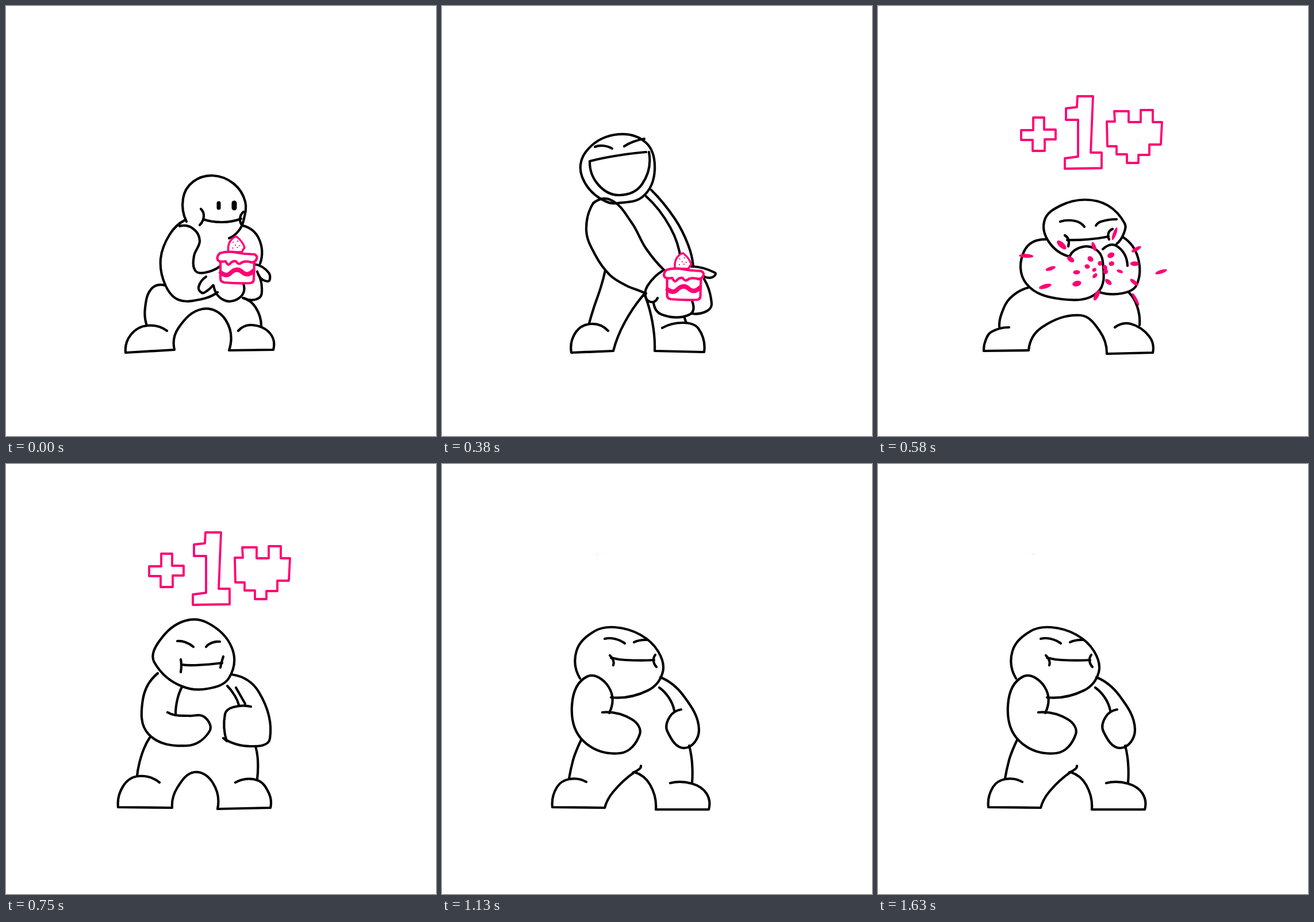
Animation of 748 by 748 pixels, one loop 1790 ms. Source, as an HTML page:

```html
<!DOCTYPE html>
<html lang="en">
<head>
<meta charset="utf-8">
<title>Cake snack</title>
<style>
html, body { margin: 0; width: 100%; height: 100%; overflow: hidden; background: #fff; }
svg { display: block; width: 100%; height: 100%; }
g { stroke-width: 4.2; stroke-linecap: round; stroke-linejoin: round; }
#body { fill: none; stroke: #000; }
#body .dotL { stroke-width: 7; }
#body .dotR { stroke-width: 9; }
#cake { fill: #fff; stroke: #ff0073; }
#bonus { fill: none; stroke: #ff0073; stroke-width: 3.8; }
#crumbs { fill: #ff0073; }
</style>
</head>
<body>
<svg viewBox="0 0 748 748">
  <path id="speck" d="M268.500 157.500l3-1.500" stroke="#ffb3d3"/>
  <g id="body"></g>
  <g id="cake">
    <path d="M373 444V474Q373 480 380 481Q404 483 425 482Q432 481 431 473L432 444Z"/>
    <path d="M374 464Q384 472 391 464Q402 454 411 463Q420 471 430 461" fill="none" stroke-width="7.500"/>
    <path d="M387 428Q385 417 390 409Q396 401 401 401Q412 410 415 420L410 428Z" stroke-width="3.500"/>
    <path d="M395 411h.1m8-2h.1m-4 7h.1m7 1h.1m-12 4h.1m8-1h.1" stroke-width="2.200"/>
    <path d="M372 430Q386 426 401 429T432 432Q439 435 435 442Q431 448 424 445Q414 443 409 447T400 444Q394 443 390 448T382 444Q370 446 368 441T372 430Z"/>
  </g>
  <g id="crumbs"></g>
  <g id="bonus">
    <path d="M270 156h19v21h20v17h-19v20h-21v-19h-20v-17h21z"/>
    <path d="M347 119h27l-4 98h19v27l-64 1v-18l23-3v-64h-21v-20l19-2z"/>
    <path d="M411 145h25v19h21v-21h21v21h16l-2 39h-20v18h-19v14h-20v-15h-18v-14h-16l-1-43h14z"/>
  </g>
</svg>
<script>
const LOOP = 1790;
const $ = id => document.getElementById(id);

// Key points of each stroke, joined by smooth curves; "|" marks a corner.
const sit = {
  legs: "280,565 245,556 217,572 208,603 | 293,598 | 300,560 342,527 382,546 388,599 | 465,598 | 459,569 428,555 404,565",
  hipL: "245,556 242,525 253,492 277,486",
  hipR: "412,508 434,524 444,557",
  head: "314,375 308,335 325,306 360,295 396,309 416,340 413,374 404,392 388,404",
  dotL: "370,343 370,351",
  dotR: "397,343 397,351",
  mouth: "343,371 376,376 409,370",
  cheekL: "339,353 344,366 337,381",
  cheekR: "413,358 407,370 411,382",
  armL: "312,372 285,397 269,440 277,485 300,511 340,510 368,498",
  inner: "302,383 325,387 337,408 327,435 329,460 345,464 372,453",
  armR: "412,382 440,405 442,448",
  thumbL: "348,471 335,489 341,499 349,496 360,486",
  handL: "361,486 380,512 408,506 413,483",
  thumbR: "432,449 457,464 455,479 437,462",
  handR: "414,508 440,508 445,490 439,467",
  cake: [0, 0]
};
const crouch = {
  legs: "265,576 233,562 206,578 201,605 | 280,601 | 283,562 310,539 372,545 406,601 | 488,596 | 486,562 452,544 417,558",
  hipL: "230,560 231,525 245,502 279,494",
  hipR: "424,497 450,518 459,545",
  side: "273,455 279,494",
  head: "316,391 316,358 343,331 370,327 405,335 434,357 436,380 428,405 418,414",
  eyeL: "352,367 363,373 379,375",
  eyeR: "399,375 412,373 420,366",
  mouth: "349,400 375,400 405,397",
  cheekL: "349,388 347,400 348,413",
  cheekR: "420,383 420,392 426,397",
  chin: "348,424 380,430",
  armL: "330,408 311,391 285,407 272,440 287,474 322,486 346,478",
  inner: "330,405 331,425 340,444 357,449 380,440",
  thumbL: "361,453 345,482 349,489 358,486 369,471",
  handL: "372,470 385,498 417,498 426,470",
  thumbR: "444,437 465,453 458,460 441,453",
  handR: "428,496 448,498 453,480 444,456",
  cake: [9.5, -14]
};
const laugh = {
  legs: "289,565 260,553 233,567 225,603 | 298,600 | 318,550 352,501 | 366,550 370,600 | 456,602 | 446,561 420,551 383,560",
  hipL: "256,552 264,525 276,490 284,460",
  hipR: "422,542 423,546 425,551",
  head: "285,340 244,298 250,254 300,224 354,237 370,285 350,331 305,343 285,340",
  eyeL: "266,245 280,243 296,248",
  eyeR: "317,244 333,236 352,231",
  mouth: "257,270 300,261 355,254",
  jaw: "257,271 272,311 308,329 348,310 360,254",
  armL: "263,343 251,390 266,432 292,468 322,487 340,494 355,500",
  inner: "263,343 295,338 330,377 355,422 387,460",
  armR: "364,320 405,370 428,415 437,453",
  fold: "355,331 397,385 415,440",
  thumbL: "383,461 358,486 354,505 364,515 375,508",
  handL: "368,515 383,537 430,537 435,513",
  thumbR: "433,453 475,464 470,472 455,470",
  handR: "456,475 469,518 460,531 435,535",
  cake: [18.5, 29]
};
const munch = {
  legs: "228,559 197,567 187,582 184,600 | 262,599 | 285,559 352,538 386,566 398,605 | 478,603 | 472,575 440,553 412,559",
  hipL: "211,558 215,535 230,508 261,490",
  hipR: "437,499 451,523 455,555",
  head: "333,436 297,410 290,372 318,347 360,337 400,347 429,378 427,397 415,414",
  eyeL: "317,375 343,374 359,384",
  eyeR: "379,382 388,375 415,371",
  mouth: "329,407 365,406 401,401",
  cheekL: "325,399 331,406 331,418",
  cheekR: "408,388 401,395 402,406",
  armL: "294,406 254,427 258,483 320,510 382,498 391,445 375,421 347,422 332,440",
  armR: "426,402 452,437 450,485 424,500 383,497",
  fist: "391,423 416,418 434,452",
  cake: [-5, -20]
};
const flex = {
  legs: "267,554 230,543 204,560 195,597 | 289,598 | 298,563 328,536 360,555 368,600 | 460,598 | 457,572 437,550 399,554",
  hipL: "228,543 232,520 240,495 250,476",
  hipR: "434,491 438,515 437,548",
  head: "307,387 258,345 264,312 305,275 350,276 393,320 388,372 350,391 307,387",
  eyeL: "298,308 312,310 326,318",
  eyeR: "348,318 358,311 372,309",
  mouth: "305,349 330,350 376,346",
  cheekL: "304,340 305,350 304,362",
  cheekR: "378,335 375,345 373,354",
  armL: "264,364 238,410 248,470 314,490 354,465 345,440 318,438 295,437 281,432",
  inner: "306,388 298,410 295,436",
  armR: "392,366 440,397 459,478 425,491 378,477 | 384,482 | 381,435 395,423 426,422",
  fold: "385,386 398,403 405,419",
  crease: "400,389 416,417"
};
const proud = {
  legs: "251,553 222,548 200,562 192,597 | 283,598 | 298,570 335,536 | 362,558 372,601 | 464,601 | 460,573 435,556 397,555",
  seam: "332,537 344,530 346,525",
  hipL: "221,547 228,515 234,498 242,480",
  hipR: "430,490 435,520 435,554",
  head: "240,373 234,325 265,291 301,284 345,297 376,326 384,362 358,394 294,406",
  eyeL: "283,304 300,304 318,312",
  eyeR: "334,310 343,307 356,306",
  mouth: "294,337 320,341 369,341",
  cheekL: "292,333 298,342 298,350",
  cheekR: "371,332 368,342 373,353",
  armL: "291,433 290,388 252,370 226,420 245,481 310,503 344,470 330,444 279,432",
  armR: "380,371 420,403 447,462 422,494 392,465 396,440 416,427",
  fold: "378,389 395,407 404,429"
};

const lerp = (a, b, t) => a + (b - a) * t;
const mix = (p, q, t) => p.map((v, i) => lerp(v, q[i], t));
const dist = (p, q) => Math.hypot(p[0] - q[0], p[1] - q[1]);

// One smooth run: tangents follow the neighbours, the ends bend like quadratics.
function curve(pts) {
  const last = pts.length - 1;
  const handle = (i, len) => {
    const [p, q] = [pts[i - 1], pts[i + 1]], k = 0.36 * len / dist(p, q);
    return pts[i].map((v, c) => v + (q[c] - p[c]) * k);
  };
  const endHandle = (end, near, c) => mix(end, mix(near, c, 1.5), 2 / 3);
  let d = "";
  for (let i = 0; i < last; i++) {
    const [a, b] = [pts[i], pts[i + 1]], len = dist(a, b);
    let out = i > 0 && handle(i, len);
    let into = i + 1 < last && handle(i + 1, -len);
    if (!out && !into) { d += "L" + b; continue; }
    out = out || endHandle(a, b, into);
    into = into || endHandle(b, a, out);
    d += "C" + [out, into, b].join(" ");
  }
  return d;
}

function toPath(text) {
  let joint = null, d = "";
  for (const part of text.split(" | ")) {
    const pts = part.split(" ").map(p => p.split(",").map(Number));
    if (joint) pts.unshift(joint);
    else d = "M" + pts[0];
    d += curve(pts);
    joint = pts[pts.length - 1];
  }
  return d;
}

// Strokes with equal point counts blend; others swap halfway.
function blend(a, b, t) {
  const number = /[\d.]+/g;
  const goal = b && b.match(number);
  if (!a || !b || a.match(number).length !== goal.length) return t < 0.5 ? a : b;
  let i = 0;
  return a.replace(number, v => lerp(+v, +goal[i++], t));
}

function drawBody(a, b, t) {
  let html = "";
  for (const name of new Set([...Object.keys(a), ...Object.keys(b)])) {
    const stroke = name !== "cake" && blend(a[name], b[name], t);
    if (stroke) html += `<path class="${name}" d="${toPath(stroke)}"/>`;
  }
  $("body").innerHTML = html;
}

function drawCrumbs(spread, size) {
  let seed = 7, html = "";
  const random = () => (seed = seed * 16807 % 2147483647) / 2147483647;
  for (let i = 0; i < 26; i++) {
    const turn = i * 2.4, r = 10 + 130 * (i / 26) ** 1.3;
    const x = Math.cos(turn) * r, y = Math.sin(turn) * r * 0.5;
    const angle = Math.atan2(y, x) * 180 / Math.PI + (random() - 0.5) * 50;
    const rx = (3 + r / 14) * size, ry = (2.5 + random() * 2.5) * size;
    html += `<ellipse rx="${rx}" ry="${ry}" transform="translate(${385 + x * spread} ${455 + y * spread}) rotate(${angle})"/>`;
  }
  $("crumbs").innerHTML = html;
}

const cues = [[0, sit], [5, crouch], [9, laugh], [14, munch], [18, flex], [21, proud]];
const show = (id, on) => $(id).setAttribute("visibility", on ? "visible" : "hidden");
const shift = (id, x, y) => $(id).setAttribute("transform", `translate(${x} ${y})`);

function draw(step) {
  const i = cues.filter(c => c[0] <= step).length - 1;
  const [begin, a] = cues[i], [end, b] = i && cues[i + 1] || [begin + 1, a];
  const u = Math.min(1, (step - begin) / (end - begin)), t = u * u * (3 - 2 * u);
  drawBody(a, b, t);

  show("cake", step < 13);
  if (step < 13) shift("cake", ...mix(a.cake, b.cake, t));

  const age = step - 14;
  show("crumbs", age >= -1 && age < 3);
  drawCrumbs(1 + 0.14 * age, Math.min(1, 1.2 - 0.35 * age));

  const blink = step < 27 || (step < 39 && Math.floor((step - 27) / 2) % 2 === 1);
  show("bonus", age >= 0 && blink);
  shift("bonus", 0, 38 * Math.max(0, 1 - age / 3) ** 2);
  show("speck", step >= 27);
}

// 24 steps per second, with step times rounded to 10 ms
let shown = -1;
const start = performance.now();
function tick() {
  const time = (performance.now() - start) % LOOP;
  const step = Math.floor((Math.floor(time / 10) * 10 + 4.9) * 0.024);
  if (step !== shown) draw(shown = step);
  requestAnimationFrame(tick);
}
tick();
</script>
</body>
</html>
```
